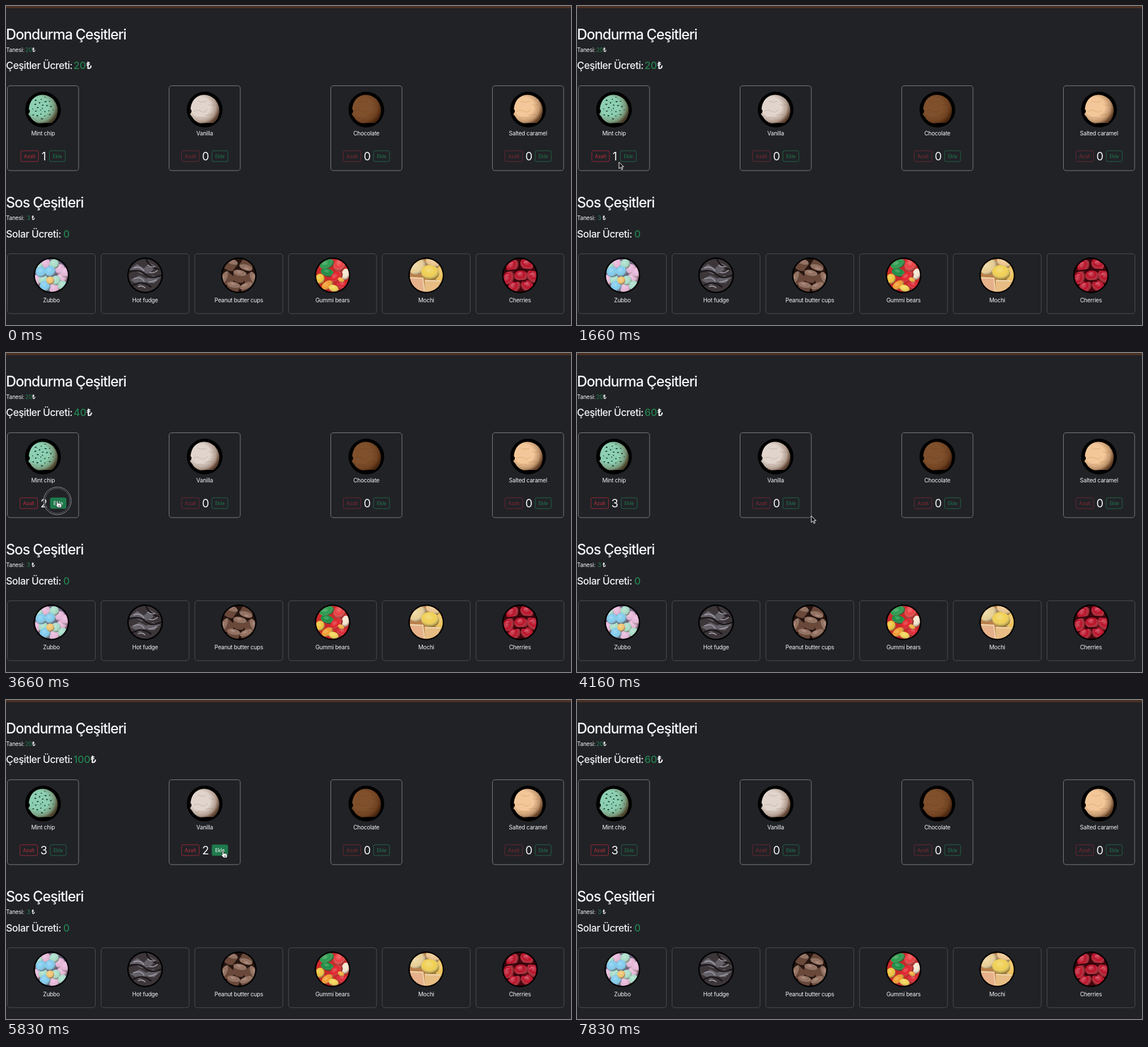
Animation of 996 by 562 pixels, one loop 8000 ms. Source, as an HTML page:

```html
<!DOCTYPE html>
<html lang="tr">
<head>
<meta charset="utf-8">
<title>Dondurma</title>
<style>
  html, body { margin: 0; width: 100%; height: 100%; overflow: hidden; background: #212226; }
  svg { display: block; width: 996px; height: 562px; font: 10px Inter, sans-serif; letter-spacing: -.022em; fill: #f4f5f6; }
  .h1 { font-size: 25px; font-weight: 500; letter-spacing: -.041em; }
  .h2 { font-size: 17.5px; font-weight: 500; letter-spacing: -.026em; }
  .mid { text-anchor: middle; }
  .count { font-size: 20px; letter-spacing: 0; }
  .btn { font-size: 8.6px; letter-spacing: -.01em; }
  .green { fill: #22824f; }
  .lira { font-weight: 600; }
  #total { letter-spacing: 0; }
</style>
</head>
<body>
<svg viewBox="0 0 996 562">
  <defs>
    <radialGradient id="shade" cx=".4" cy=".35" r=".68">
      <stop offset="0" stop-color="#fff" stop-opacity=".28"/>
      <stop offset=".5" stop-color="#fff" stop-opacity="0"/>
      <stop offset="1" stop-color="#201000" stop-opacity=".6"/>
    </radialGradient>
    <radialGradient id="scoopShade" cx=".36" cy=".42" r=".66">
      <stop offset=".5" stop-color="#4a2208" stop-opacity="0"/>
      <stop offset=".8" stop-color="#4a2208" stop-opacity=".3"/>
      <stop offset="1" stop-color="#3a1a06" stop-opacity=".8"/>
    </radialGradient>
    <clipPath id="round"><circle r="29"/></clipPath>
    <path id="scoop" d="M-25-1Q-23-20-8-25Q6-29 18-18Q28-6 25 7Q23 18 15 23L-8 24Q-18 21-22 13L-26 8Q-21 3-25-1Z"/>
  </defs>
  <rect width="996" height="4" fill="#4a3124"/>
  <text class="h1" y="59">Dondurma Çeşitleri</text>
  <text y="81">Tanesi: <tspan x="34" class="green">20</tspan><tspan class="lira">₺</tspan></text>
  <text class="h2" y="111">Çeşitler Ücreti: <tspan x="119" class="green" id="total">20</tspan><tspan class="lira">₺</tspan></text>
  <text class="h1" y="355">Sos Çeşitleri</text>
  <text y="377">Tanesi: <tspan x="36.5" class="green">3</tspan><tspan x="45" class="lira">₺</tspan></text>
  <text class="h2" y="407.5">Solar Ücreti: <tspan x="101" class="green">0</tspan></text>
  <g id="cards"></g>
  <g id="counters"></g>
  <g id="pointer"></g>
</svg>
<script>
const $ = id => document.getElementById(id);

let seed = 7;
const rand = (a, b) => a + (b - a) * ((seed = seed * 16807 % 2147483647) / 2147483647);

const at = (x, y, inner) => `<g transform="translate(${x} ${y})">${inner}</g>`;
const blob = (fill, x, y, rx, ry = rx, turn = 0) => {
  const shape = `<ellipse rx="${rx}" ry="${ry}" transform="translate(${x} ${y}) rotate(${turn})" fill=`;
  return `${shape}"${fill}"/>${shape}"url(#shade)"/>`;
};
const line = (color, width, d) =>
  `<path d="${d}" fill="none" stroke="${color}" stroke-width="${width}" stroke-linecap="round"/>`;
const patch = (color, d) => `<path d="${d}" fill="${color}"/>`;
const base = color => `<circle r="30" fill="${color}"/>`;

function chips() {
  let out = '';
  for (let i = 0; i < 24; i++) {
    const a = i * 2.4, r = 4.2 * Math.sqrt(i);
    out += `<ellipse cx="${Math.cos(a) * r - 1}" cy="${Math.sin(a) * r - 2}" rx="${rand(.8, 2)}" ry="${rand(.6, 1.2)}" fill="#14352c"/>`;
  }
  return out;
}

const scoop = (color, crease, extra = '') =>
  `<use href="#scoop" fill="${color}"/>` +
  line(crease, .8, 'M-20 3Q-13-1-7 3T5 0M-12-15Q-4-11 3-15M1 10Q8 7 15 9M-14 15Q-7 11-1 16M7-9Q12-6 18-8') +
  extra + '<use href="#scoop" fill="url(#scoopShade)"/>';

const creams = [
  ['Mint chip', scoop('#8ed0b2', '#71b799', chips())],
  ['Vanilla', scoop('#e0d4cc', '#c2aea2')],
  ['Chocolate', scoop('#80502c', '#704423')],
  ['Salted caramel', scoop('#f3c799', '#dba56c')],
];

const candies = () => base('#6f6480') +
  [[-10, -20], [15, -11], [18, 5], [-25, 8], [5, 23], [25, -5]].map(p => blob('#e5b5d8', ...p, 9)).join('') +
  [[5, -20], [8, 9], [-14, 8], [20, 18], [-23, -15]].map(p => blob('#a7dcc8', ...p, 8.5)).join('') +
  [[-18, -6], [-2, -7], [-11, 19]].map(p => blob('#7fcbee', ...p, 9.5)).join('') +
  blob('#f2c46e', -2, 9, 7);

const fudge = () => base('#3c3639') +
  patch('#646068', 'M-29-10L-14-20-2-12 8-22 20-16 8-4-6-2-18-8ZM-26 8L-10 0 2 6 14 0 27 4 16 14 2 12-10 18Z') +
  line('#1d181b', 3, 'M-28-6Q-10-12 0-2T28 0M-22 18Q-5 8 10 20M2-28Q8-14 24-10') +
  line('#a5a1ac', 1.6, 'M-20-13Q-10-18-2-8M-20 6Q-8 1-2 10M8-5Q16-3 22-9M6 12Q12 12 20 8M5-18Q10-14 16-15M-12 20Q-5 17 0 22');

const cup = (x, y, turn) => `<g transform="translate(${x} ${y}) rotate(${turn})">
  <path d="M-12-5L-9 10Q0 14 9 10L12-5Z" fill="#6a483a"/>${blob('#8f6a59', 0, -5, 12, 5.5)}</g>`;
const cups = () => base('#24140f') + cup(-15, -20, 25) + cup(14, -19, 200) + cup(-21, 6, -60) +
  cup(21, 7, 70) + cup(-10, 22, 15) + cup(15, 23, -20) + cup(1, 1, 15);

const gummies = () => base('#c92a2a') +
  blob('#25994a', -10, -20, 13, 8, -20) + blob('#e93c3f', 12, -18, 10, 12, 20) +
  blob('#f3e4cd', 23, -2, 7, 10, 10) + blob('#168a3d', -9, -5, 12, 7, 15) +
  blob('#efc238', -22, 6, 8, 9) + blob('#e02028', 7, 2, 12, 8, -35) +
  blob('#f09b2c', -9, 17, 11, 7, -30) + blob('#f2d453', 2, 23, 9, 6, 20) +
  blob('#dd2430', 17, 17, 10, 8, 30) + blob('#f2aa3a', 15, 8, 6, 4, 30);

const mochi = () => base('#b9804c') +
  blob('#e9cf94', -15, -15, 16, 13, -25) + blob('#ecc58e', 14, -23, 15, 9, 15) +
  blob('#edc158', 25, 0, 9, 16) + blob('#f0cf50', 7, -5, 16, 13, 10) +
  patch('#e6b18a', 'M-30 4L-6 5-3 30H-30Z') + patch('#e7bd83', 'M-3 8L25 10 20 30H-2Z') +
  line('#f2dcb5', 1.8, 'M-28 4L-6 5-3 28M-1 9L24 10');

const cherries = () => base('#45040d') +
  [[-13, -17], [12, -19], [-20, 4], [2, 1], [22, 2], [-10, 20], [13, 19]].map(([x, y]) =>
    blob('#b80f26', x, y, 12, 9.5, x * 3) + line('#e2627a', 1.3, `M${x - 5} ${y - 3}q3-3 6-2`)).join('') +
  line('#33030a', 2.4, 'M-26-7Q-12-9-3-10T25-9M-10 11Q2 9 10 10M-2-26Q0-18-3-12');

const sauces = [
  ['Zubbo', candies()], ['Hot fudge', fudge()], ['Peanut butter cups', cups()],
  ['Gummi bears', gummies()], ['Mochi', mochi()], ['Cherries', cherries()],
];

const card = (x, y, w, h, border, photoY, nameY, [name, photo]) =>
  `<rect x="${x}" y="${y}" width="${w}" height="${h}" rx="4.5" fill="none" stroke="${border}"/>` +
  at(x + w / 2, photoY, `<circle r="31.5" fill="#000"/><g clip-path="url(#round)">${photo}</g>`) +
  `<text class="mid" x="${x + w / 2}" y="${nameY}">${name}</text>`;

$('cards').innerHTML =
  creams.map((c, i) => card(2.5 + 285 * i, 140.5, 125.5, 149.5, '#7d7e81', 182.5, 228, c)).join('') +
  sauces.map((s, i) => card(2.5 + 165.2 * i, 436.5, 155, 105.5, '#4e4f53', 474.5, 521.5, s)).join('');

function button(x, w, label, color, hovered, disabled) {
  return `<g class="btn mid" opacity="${disabled ? .6 : 1}">
    <rect x="${x}" y="255" width="${w}" height="19" rx="2.5" stroke="${color}" stroke-width=".8" fill="${hovered ? color : 'none'}"/>
    <text x="${x + w / 2}" y="267.7" fill="${hovered ? '#fff' : color}">${label}</text></g>`;
}

function counter(i, count, hovered) {
  const cx = 65.4 + 285 * i, digit = count === 1 ? 8.5 : 11.7, left = cx - 35 - digit / 2;
  const red = hovered === 'Azalt' ? '#dc3545' : '#bd2d3c';
  return button(left, 31, 'Azalt', red, hovered === 'Azalt', !count) +
    `<text class="count mid" x="${left + 36.4 + digit / 2}" y="272">${count}</text>` +
    button(left + 41.8 + digit, 28, 'Ekle', '#1f7a4d', hovered === 'Ekle');
}

const arrow = '<path d="M0 0V11.5L2.7 9 4.7 13.3 6.7 12.4 4.8 8.2H8.4Z" fill="#111" stroke="#fff"/>';
const hand = `<path d="M-1.3 1Q0-.8 1.2 1V4.5L3 4 5 4.5 7 5.5Q8.4 9 6.8 12H1.2Q-1 9.5-2.8 7.5L-1.8 6.4-1.3 7Z"
  fill="#fff" stroke="#111" stroke-width=".8" stroke-linejoin="round"/>` + line('#111', .7, 'M2.6 8V10.5M4.6 8V10.5');
const ring = `<circle r="23.3" fill="none" stroke="#1c1d20" stroke-width="2.6" opacity=".85"/>
  <circle r="24.4" fill="none" stroke="#a5a6a8" stroke-width=".9"/>
  <circle r="22" fill="none" stroke="#77787b" stroke-width=".8"/>`;

// Pointer stops: time in ms, x, y
const path = [
  [500, -10, 310], [1330, 66, 284], [1500, 66, 284], [1660, 74, 275], [2500, 85, 277], [2700, 85, 277],
  [2830, 90.5, 260.5], [3830, 90.5, 260.5], [4160, 413, 287], [5160, 382.5, 266], [6000, 382.5, 266],
  [6660, 328.5, 265], [7330, 328.5, 265], [7660, 350, 470],
];
const presses = [[2830, 3160], [3660, 3830], [5160, 5500], [6660, 6830], [7160, 7330]];
const within = (t, [a, b]) => t >= a && t < b;

function pointerAt(t) {
  const i = path.findIndex(p => p[0] > t);
  if (i < 1) return path[path.length - 1].slice(1);
  const [t0, x0, y0] = path[i - 1], [t1, x1, y1] = path[i];
  const u = (t - t0) / (t1 - t0), e = u * u * (3 - 2 * u);
  return [x0 + (x1 - x0) * e, y0 + (y1 - y0) * e];
}

function render(t) {
  const mint = t < 3000 ? 1 : t < 3830 ? 2 : 3;
  const vanilla = t < 5330 ? 0 : t < 5830 ? 1 : t < 6830 ? 2 : t < 7330 ? 1 : 0;
  const mintHover = within(t, [3000, 4000]) && 'Ekle';
  const vanillaHover = within(t, [5160, 6160]) ? 'Ekle' : within(t, [6500, 7330]) && 'Azalt';
  $('total').textContent = 20 * (mint + vanilla);
  $('counters').innerHTML = counter(0, mint, mintHover) + counter(1, vanilla, vanillaHover) + counter(2, 0) + counter(3, 0);

  const pressed = presses.some(p => within(t, p));
  const shape = pressed || mintHover || vanillaHover ? hand : arrow;
  $('pointer').innerHTML = within(t, [500, 7830]) ? at(...pointerAt(t), (pressed ? ring : '') + shape) : '';
}

// The picture advances six times a second
let shown = -1;
function tick(now) {
  const step = Math.floor((now % 8000 + 7) * 6 / 1000) % 48;
  if (step !== shown) render(Math.ceil((shown = step) * 1000 / 6));
  requestAnimationFrame(tick);
}
tick(performance.now());
</script>
</body>
</html>
```
